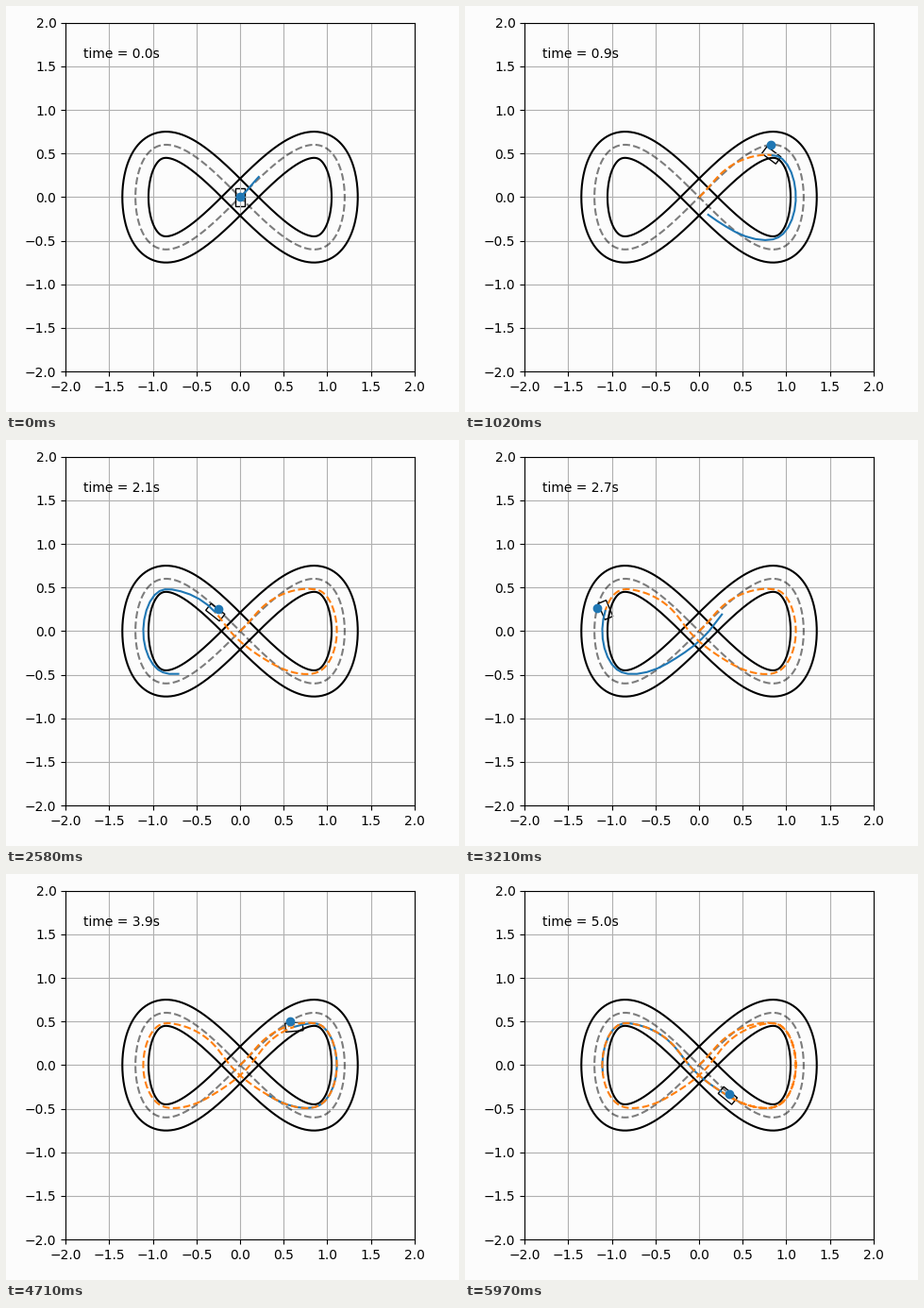
A matplotlib script that plays this animation: 480x430 px, repeating every 6000 ms.

```python
import numpy as np
import matplotlib.pyplot as plt
from matplotlib.animation import FuncAnimation
from matplotlib.patches import Polygon

FRAMES, INTERVAL, DT = 200, 30, 0.025
HALF_WIDTH = 0.15
CAR_L, CAR_W = 0.2, 0.1
ACCEL, CRUISE = 2.86, 2.295
HORIZON = 2.42
BG = "#fcfcfc"

# Racing line through the right loop: phase, offset to the left, slip in degrees.
# The left loop is its mirror image.
KEYS = np.array([(0, -0.085, -2), (0.25, -0.04, -6), (0.65, -0.11, -38),
                 (1.57, -0.09, -30), (2.45, -0.1, 14), (2.83, 0.02, 2)])
LOOPS = np.arange(-1, 6)
KEY_PHASE = (LOOPS[:, None] * np.pi + KEYS[:, 0]).ravel()
KEY_OFFSET, KEY_SLIP = (((-1.0) ** LOOPS[:, None] * col).ravel()
                        for col in KEYS[:, 1:].T)


def smooth(x, xs, ys):
    """Cubic Hermite curve through the knots."""
    m = np.gradient(ys, xs)
    k = np.searchsorted(xs, x, side="right") - 1
    h = xs[k + 1] - xs[k]
    u = (x - xs[k]) / h
    return ((1 + 2 * u) * (1 - u) ** 2 * ys[k] + u * (1 - u) ** 2 * h * m[k]
            + u * u * (3 - 2 * u) * ys[k + 1] + u * u * (u - 1) * h * m[k + 1])


# Track: a figure eight
def centre(p):
    return np.array([1.2 * np.sin(p), 0.6 * np.sin(2 * p)])


def tangent(p):
    v = np.array([1.2 * np.cos(p), 1.2 * np.cos(2 * p)])
    return v / np.hypot(*v)


def offset(p, d):
    tx, ty = tangent(p)
    return centre(p) + d * np.array([-ty, tx])


# Phase for a given arc length
PHASE = np.linspace(0, 4.5 * np.pi, 6000)
SPEED = 1.2 * np.hypot(np.cos(PHASE), np.cos(2 * PHASE))
ARC = np.concatenate([[0], np.cumsum((SPEED[1:] + SPEED[:-1]) / 2 * np.diff(PHASE))])


def phase(s):
    return np.interp(s, ARC, PHASE)


def travelled(t):
    """Constant acceleration from rest, then cruising."""
    ramp = np.minimum(t, CRUISE / ACCEL)
    return ACCEL * ramp ** 2 / 2 + CRUISE * (t - ramp)


def launch(p):
    """Fades from 1 to 0 while the car joins the racing line."""
    return np.maximum(0, 1 - p / 0.75)


def line_at(p):
    return offset(p, smooth(p, KEY_PHASE, KEY_OFFSET) + 0.085 * launch(p))


def car_corners(p):
    tx, ty = tangent(p)
    slip = smooth(p, KEY_PHASE, KEY_SLIP) + 47 * launch(p) ** 3
    a = np.arctan2(ty, tx) + np.radians(slip)
    c, n = np.cos(a), np.sin(a)
    box = np.array([(-1, -1), (1, -1), (1, 1), (-1, 1)]) * (CAR_L / 2, CAR_W / 2)
    return box @ np.array([[c, n], [-n, c]]) + line_at(p)


times = np.arange(FRAMES) * DT
trail_xy = line_at(phase(travelled(times)))

W, H = 480, 430
fig = plt.figure(figsize=(W / 100, H / 100), dpi=100, facecolor=BG)
ax = fig.add_axes([63.2 / W, 42.8 / H, 369.6 / W, 369.6 / H], facecolor=BG)
ax.set(xlim=(-2, 2), ylim=(-2, 2))
ticks = np.arange(-2, 2.1, 0.5)
ax.set_xticks(ticks)
ax.set_yticks(ticks)
ax.grid(True)

lap = np.linspace(0, 2 * np.pi, 400)
ax.plot(*centre(lap), "k--", alpha=0.5)
for side in (-HALF_WIDTH, HALF_WIDTH):
    ax.plot(*offset(lap, side), "k-")

plan, = ax.plot([], [], "-", color="C0")
trail, = ax.plot([], [], "--", color="C1")
target, = ax.plot([], [], "o", color="C0")
car = ax.add_patch(Polygon(np.zeros((4, 2)), closed=True, fill=False, ec="k", lw=1))
label = ax.text(0.05, 0.9, "", transform=ax.transAxes)


def update(i):
    t = i * DT
    s = travelled(t)
    p = phase(s)
    ahead = HORIZON * (1 - 0.87 * np.exp(-t / 0.15))
    plan.set_data(*line_at(phase(np.linspace(s, s + ahead, 21))))
    trail.set_data(*trail_xy[:, :i + 1])
    x, y = centre(p)
    target.set_data([x], [y])
    car.set_xy(car_corners(p))
    label.set_text(f"time = {t:.1f}s")
    return plan, trail, target, car, label


anim = FuncAnimation(fig, update, frames=FRAMES, interval=INTERVAL,
                     repeat=True, repeat_delay=0, blit=False)
plt.show()
```
